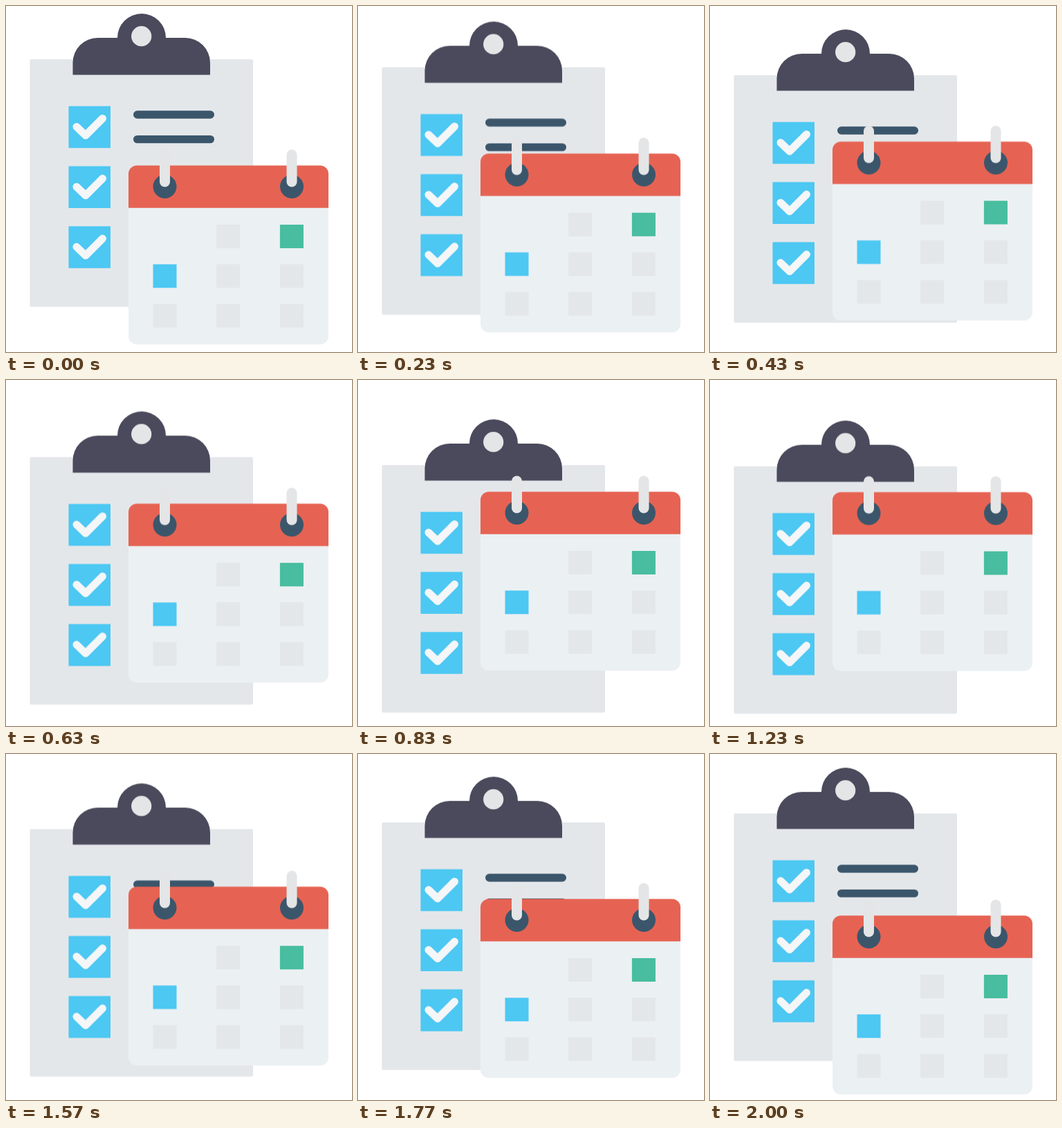
An HTML page for the animation above (2030 ms loop, 500 px wide and 500 px high).

```html
<!DOCTYPE html>
<html lang="en">
<head>
<meta charset="utf-8">
<title>Checklist and calendar</title>
<style>
  html, body { margin: 0; width: 100%; height: 100%; overflow: hidden; background: #fff; }
  svg { display: block; width: 100vw; height: 100vh; }

  /* The loop has 61 equal ticks; steps() holds each pose for one tick. */
  .board, .calendar { animation: 2030ms -4ms infinite; }
  .board { animation-name: sink; }
  .calendar { animation-name: rise; }

  @keyframes sink {
    0%       { transform: translateY(0); animation-timing-function: steps(1); }
    1.6393%  { transform: translateY(0); animation-timing-function: steps(30); }
    50.8197% { transform: translateY(57.3px); animation-timing-function: steps(22); }
    86.8852% { transform: translateY(21.8px); animation-timing-function: steps(8); }
    100%     { transform: translateY(6.9px); }
  }
  @keyframes rise {
    0%       { transform: translateY(0); animation-timing-function: steps(1); }
    1.6393%  { transform: translateY(0); animation-timing-function: steps(30); }
    50.8197% { transform: translateY(-86.3px); animation-timing-function: steps(22); }
    86.8852% { transform: translateY(-21px); animation-timing-function: steps(8); }
    100%     { transform: translateY(6.4px); }
  }

  .paper, .cell { fill: #e4e7ea; }
  .clip { fill: #4a4a5c; }
  .metal { fill: #e4e5e6; }
  .blue { fill: #4cc8f3; }
  .green { fill: #48bd9f; }
  .red { fill: #e66353; }
  .sheet { fill: #ebf0f3; }
  .navy { fill: #3b566b; }
  .tick { fill: none; stroke: #f4f6f8; stroke-width: 11; stroke-linecap: round; stroke-linejoin: round; }
</style>
</head>
<body>
<svg viewBox="0 0 500 500">
  <defs>
    <g id="check">
      <rect class="blue" x="90.5" y="144.7" width="60.5" height="60.5"/>
      <path class="tick" d="M102 174.5 L115 187 L139.5 162.5"/>
    </g>
    <g id="ring">
      <circle class="navy" cx="229.5" cy="261" r="17"/>
      <rect class="metal" x="222" y="207.5" width="15" height="54" rx="7.5"/>
    </g>
    <rect id="cell" x="212.5" y="316" width="34" height="34"/>
  </defs>

  <g class="board">
    <rect class="paper" x="34.5" y="77" width="322.5" height="357.7" rx="2"/>
    <path class="clip" d="M96.5 99.5 V82 A36 36 0 0 1 132.5 46 H161 A35 35 0 0 1 231 46 H259 A36 36 0 0 1 295 82 V99.5 Z"/>
    <circle class="metal" cx="195.7" cy="43.7" r="14.6"/>
    <use href="#check"/>
    <use href="#check" y="86.8"/>
    <use href="#check" y="173.6"/>
    <rect class="navy" x="184" y="151.3" width="117" height="11.4" rx="5.7"/>
    <rect class="navy" x="184" y="186.9" width="117" height="11.4" rx="5.7"/>
  </g>

  <g class="calendar">
    <path class="sheet" d="M177 291 H466 V477 A12 12 0 0 1 454 489 H189 A12 12 0 0 1 177 477 Z"/>
    <path class="red" d="M177 291.7 V242.5 A12 12 0 0 1 189 230.5 H454 A12 12 0 0 1 466 242.5 V291.7 Z"/>
    <use href="#ring"/>
    <use href="#ring" x="183.5"/>
    <g class="cell">
      <use href="#cell" x="91.7"/>
      <use href="#cell" x="91.7" y="57.3"/>
      <use href="#cell" x="183.4" y="57.3"/>
      <use href="#cell" y="114.6"/>
      <use href="#cell" x="91.7" y="114.6"/>
      <use href="#cell" x="183.4" y="114.6"/>
    </g>
    <use class="blue" href="#cell" y="57.3"/>
    <use class="green" href="#cell" x="183.4"/>
  </g>
</svg>
</body>
</html>
```
